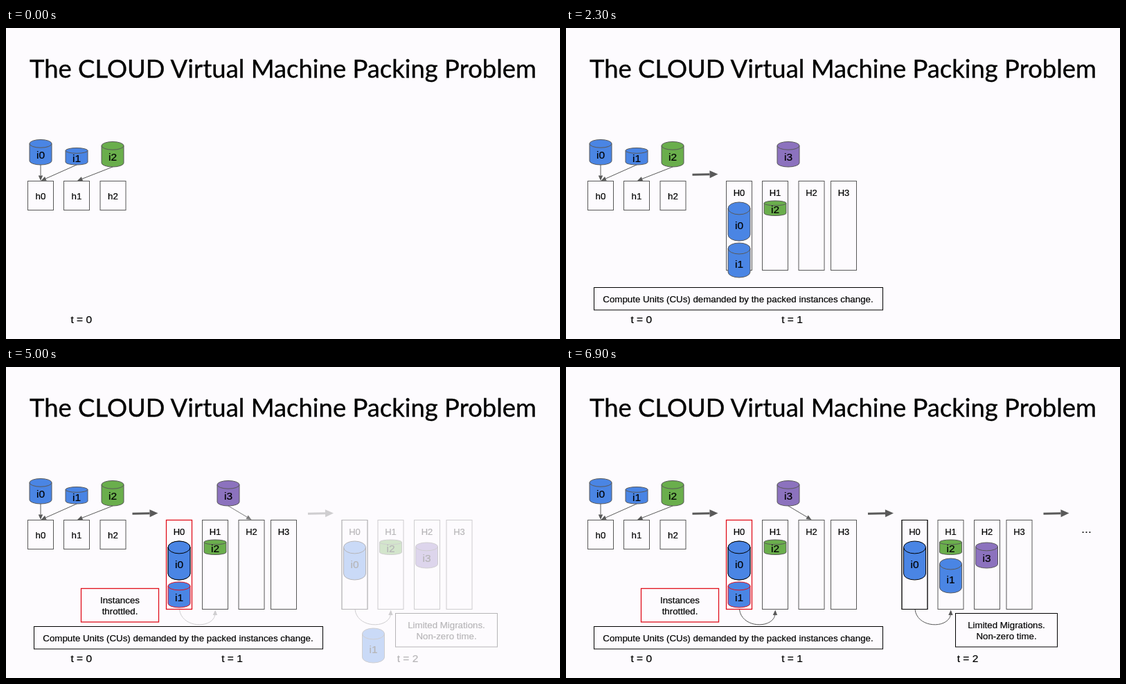
These frames come from a looping animation (800 by 450 pixels, 7 s). An HTML page:

```html
<!DOCTYPE html>
<html lang="en">
<head>
<meta charset="utf-8">
<title>Virtual Machine Packing</title>
<style>
  html, body { margin: 0; width: 100%; height: 100%; overflow: hidden; background: #fdfbfe; }
  svg { display: block; width: 100vw; height: 100vh; }
  text { font-family: "Liberation Sans", Arial, sans-serif; text-anchor: middle; fill: #000; stroke: #000; stroke-width: 0.2; }
  .title { font-family: Lato, sans-serif; font-size: 36.45px; stroke-width: 0.35; }
</style>
</head>
<body>
<svg id="stage" viewBox="0 0 800 450"></svg>
<script>
const LOOP = 7000, STEP = 100, FADE = 1000;
const BLUE = '#4a85e4', GREEN = '#6aae4c', PURPLE = '#8c72be';
const GREY = '#595959', RED = '#e0101c', BLACK = '#000';
const NEXT = 253.5;            // offset from one stage of hosts to the following one
const CUE = { hosts: 150, demand: 1290, heat: 2430, throttle: 3575, place: 4200, migrate: 4720, arrive: 5850 };

const stage = document.getElementById('stage');
const layers = [];

const text = (s, x, y, size = 13.3) => `<text x="${x}" y="${y}" font-size="${size}">${s}</text>`;

const box = (x, y, w, h, stroke = GREY, width = 1) =>
  `<rect x="${x}" y="${y}" width="${w}" height="${h}" fill="none" stroke="${stroke}" stroke-width="${width}"/>`;

// Cylinder centred on x with a label in its body
function can(name, x, top, bottom, fill, labelY, stroke = GREY) {
  const rx = 16, ry = (bottom - top) * 0.16;
  const l = x - rx, r = x + rx, a = top + ry, b = bottom - ry;
  const arc = (tx, ty, sweep) => `A${rx} ${ry} 0 0 ${sweep} ${tx} ${ty}`;
  return `<path d="M${l} ${a}${arc(r, a, 1)}V${b}${arc(l, b, 1)}Z" fill="${fill}" stroke="${stroke}"/>` +
    `<path d="M${l} ${a}${arc(r, a, 0)}" fill="none" stroke="${stroke}"/>` +
    text(name, x, labelY + 5.5, 15.5);
}

function head(x, y, angle, len, half, fill = GREY) {
  return `<path d="M0 0L${-len} ${-half}V${half}Z" fill="${fill}" transform="translate(${x} ${y}) rotate(${angle})"/>`;
}

function arrow(x1, y1, x2, y2, width = 1, len = 7.5, half = 3.2) {
  const a = Math.atan2(y2 - y1, x2 - x1);
  const ex = x2 - Math.cos(a) * len, ey = y2 - Math.sin(a) * len;
  return `<path d="M${x1} ${y1}L${ex} ${ey}" stroke="${GREY}" stroke-width="${width}"/>` +
    head(x2, y2, a * 180 / Math.PI, len, half);
}

const bigArrow = x => arrow(x, 212.3, x + 37, 211.4, 3, 12, 5.5);

const hook = x => `<path d="M${x} 351C${x + 3.5} 379 ${x + 50} 379 ${x + 51.5} 357" fill="none" stroke="${GREY}"/>` +
  head(x + 51.7, 351.5, -88, 7.5, 3.2);

const hosts = dx => [231.5, 283.5, 336, 382.5].map((x, i) =>
  box(x + dx, 221.5, 37, 129) + text('H' + i, x + dx + 18.5, 243, 13)).join('');

// A layer fades in at start and, if given, out at end
function layer(start, end, ...parts) {
  const g = document.createElementNS('http://www.w3.org/2000/svg', 'g');
  g.innerHTML = parts.join('');
  stage.appendChild(g);
  layers.push({ g, start, end });
}

layer(null, null,
  '<text class="title" x="400" y="71.5">The CLOUD Virtual Machine Packing Problem</text>',
  [31.5, 83.5, 136].map((x, i) => box(x, 221.5, 37, 42) + text('h' + i, x + 18.5, 247.5)).join(''),
  arrow(50, 198, 50, 221), arrow(102, 198, 50.5, 221), arrow(154, 201, 103, 221),
  can('i0', 50, 161.5, 198, BLUE, 183),
  can('i1', 102, 173.5, 198, BLUE, 188),
  can('i2', 154, 164.5, 201, GREEN, 186),
  text('t = 0', 108.8, 427, 15.5));

layer(CUE.hosts, null, bigArrow(182.5), hosts(0),
  can('i3', 321, 164.5, 201, PURPLE, 186), text('t = 1', 326.5, 427, 15.5));

layer(CUE.hosts, CUE.demand,
  can('i0', 250, 252, 289, BLUE, 273),
  can('i1', 250, 297.5, 322, BLUE, 312),
  can('i2', 302, 250, 286.5, GREEN, 272));

layer(CUE.demand, null,
  can('i0', 250, 252, 308, BLUE, 285),
  can('i2', 302, 250, 271.5, GREEN, 262),
  box(40.5, 375.5, 417, 32.5, BLACK),
  text('Compute Units (CUs) demanded by the packed instances change.', 248.5, 397));

layer(CUE.demand, CUE.throttle, can('i1', 250, 311, 361, BLUE, 341));

layer(CUE.heat, CUE.throttle,
  box(231.5, 351, 37, 13.5, RED, 2),
  box(108.5, 320.5, 112, 32.5, RED, 1.5),
  text('host heated.', 164.5, 342, 13));

layer(CUE.throttle, null,
  box(231.5, 221.5, 37, 129, RED, 1.3),
  can('i0', 250, 252, 308, BLUE, 285, BLACK),
  can('i1', 250, 311, 348, BLUE, 333, RED),
  box(108.5, 320.5, 112, 48.5, RED, 1.3),
  text('Instances', 164.5, 342), text('throttled.', 164.5, 358));

layer(CUE.place, null, arrow(321, 201, 354.5, 221));

layer(CUE.migrate, null, hook(250.5), bigArrow(436), hosts(NEXT),
  box(485, 221.5, 37, 129, BLACK),
  can('i0', 503.5, 252, 308, BLUE, 285, BLACK),
  can('i2', 555.5, 250, 271.5, GREEN, 262),
  can('i3', 607.5, 254, 291, PURPLE, 276),
  hook(504),
  box(562.5, 356.5, 147, 48.5, BLACK),
  text('Limited Migrations.', 636, 378), text('Non-zero time.', 636, 393.5),
  text('t = 2', 580, 427, 15.5));

layer(CUE.migrate, CUE.arrive, can('i1', 530.5, 378, 428, BLUE, 408));

layer(CUE.arrive, null,
  can('i1', 555.5, 277, 327, BLUE, 307),
  bigArrow(689.5), text('…', 751.5, 239.5, 15.5));

const ramp = (t, start) => Math.min(1, Math.max(0, (t - start) / FADE));

function draw(now) {
  const t = Math.floor((now % LOOP) / STEP) * STEP;
  for (const { g, start, end } of layers) {
    const shown = start === null ? 1 : ramp(t, start);
    g.setAttribute('opacity', shown * (end === null ? 1 : 1 - ramp(t, end)));
  }
}

const begin = performance.now();
function tick() {
  draw(performance.now() - begin);
  requestAnimationFrame(tick);
}
tick();
</script>
</body>
</html>
```
